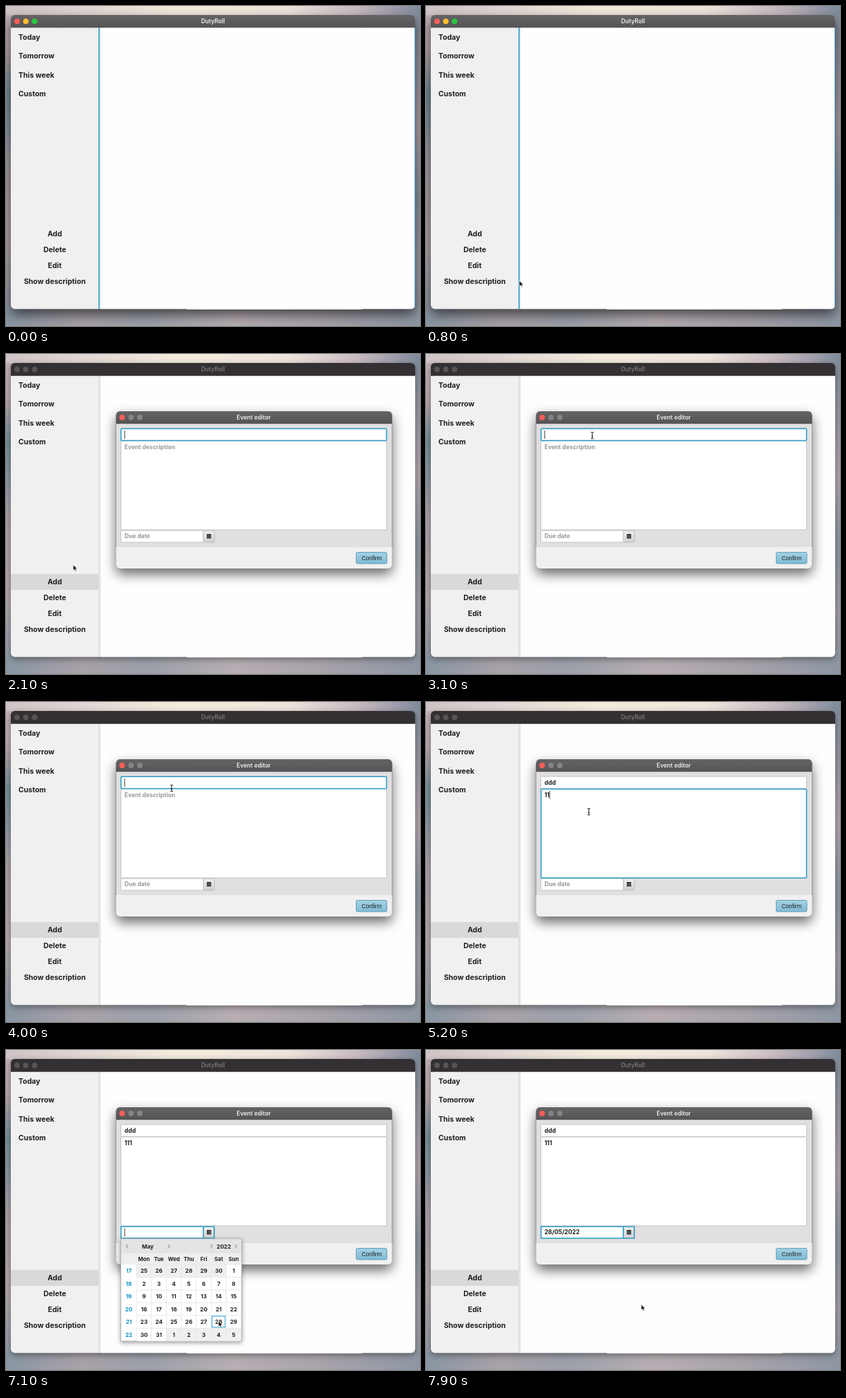
Recreate the animation shown at these times as an HTML page. Size 600 by 464 pixels, loop 8000 ms.

```html
<!DOCTYPE html>
<html lang="en">
<head>
<meta charset="utf-8">
<title>Event editor</title>
<style>
html, body { margin: 0; width: 100%; height: 100%; overflow: hidden; }
svg {
  display: block; width: 600px; height: 464px;
  background:
    linear-gradient(90deg, #cfc4c5, #e2d8d4 20%, #f3ecdd 42%, #eee4dc 68%, #cabdc2 84%, #a9a3b0 92%, #7d8b9b) 0 0 / 600px 13px no-repeat,
    linear-gradient(90deg, #8896a2, #a9a1a9 18%, #9ba0a9 34%, #b7adb3 55%, #aaa3ab 75%, #8d97a3) 0 439px / 600px 25px no-repeat,
    linear-gradient(#c3b4b9, #b9a6ab 14%, #748d97 27%, #7f929c 34%, #a99fa8 50%, #b3a8ae 75%, #8896a2) 0 0 / 300px 464px no-repeat,
    linear-gradient(#7d8b9b, #9a97a2 20%, #b0a4ac 38%, #8a95a1 60%, #a39da6 80%, #8d97a3) 300px 0 / 300px 464px no-repeat;
}
text { font: 700 8.6px Inter, sans-serif; fill: #1f1f1f; white-space: pre; }
.side text { font-size: 10.5px; }
.mid { text-anchor: middle; }
.bar { font-weight: 600; font-size: 8.5px; fill: #eee; text-anchor: middle; }
.prompt { fill: #9a9a9a; }
.field { fill: #fff; stroke: #c4c3c5; }
.ring { fill: none; stroke: #2e9fc6; stroke-width: 1.6; }
.caret { stroke: #222; stroke-width: .9; }
.cal text { font-size: 8.1px; text-anchor: middle; }
.cal .week { fill: #0b93c4; }
.chev { fill: none; stroke: #666; stroke-width: .9; }

.front { filter: drop-shadow(0 8px 9px rgba(0,0,0,.6)); }
.back { filter: drop-shadow(0 3px 5px rgba(0,0,0,.4)); }
.pop { filter: drop-shadow(0 2px 3px rgba(0,0,0,.4)); }

/* One loop is 8 s, so 1.25% is 100 ms. */
.k { animation: 8s step-end infinite; }
.active { animation-name: active; }
.inactive, .dialog { animation-name: dialog; }
.listFocus { animation-name: listFocus; }
.picked { animation-name: picked; }
.onTitle { animation-name: onTitle; }
.onText { animation-name: onText; }
.onDate { animation-name: onDate; }
.textPrompt { animation-name: textPrompt; }
.datePrompt { animation-name: datePrompt; }
.cal { animation-name: cal; }
.dateValue { animation-name: dateValue; }
.d1 { animation-name: d1; } .d2 { animation-name: d2; } .d3 { animation-name: d3; }
.n1 { animation-name: n1; } .n2 { animation-name: n2; } .n3 { animation-name: n3; }
.titleCaret { animation-name: titleCaret; }
.textCaret { animation-name: textCaret; }
.arrow { animation-name: arrow; }
.beam { animation-name: beam; }
.blink { animation: blink 1s -.2s step-end infinite; }
.blink.date { animation-delay: 0s; }
.pointer { animation: path 8s ease-in-out infinite; }

@keyframes active { 0% { opacity: 1 } 22.5%, to { opacity: 0 } }
@keyframes dialog { 0% { opacity: 0 } 22.5%, to { opacity: 1 } }
@keyframes listFocus { 0% { opacity: 1 } 16.25%, to { opacity: 0 } }
@keyframes picked { 0% { opacity: 0 } 13.75%, to { opacity: 1 } }
@keyframes onTitle { 0% { opacity: 1 } 58.75%, to { opacity: 0 } }
@keyframes onText { 0% { opacity: 0 } 58.75% { opacity: 1 } 75%, to { opacity: 0 } }
@keyframes onDate { 0% { opacity: 0 } 75%, to { opacity: 1 } }
@keyframes textPrompt { 0% { opacity: 1 } 58.75%, to { opacity: 0 } }
@keyframes datePrompt { 0% { opacity: 1 } 75%, to { opacity: 0 } }
@keyframes cal { 0% { opacity: 0 } 76.25% { opacity: 1 } 90%, to { opacity: 0 } }
@keyframes dateValue { 0% { opacity: 0 } 90%, to { opacity: 1 } }
@keyframes d1 { 0% { opacity: 0 } 52.5%, to { opacity: 1 } }
@keyframes d2 { 0% { opacity: 0 } 53.75%, to { opacity: 1 } }
@keyframes d3 { 0% { opacity: 0 } 56.25%, to { opacity: 1 } }
@keyframes n1 { 0% { opacity: 0 } 61.25%, to { opacity: 1 } }
@keyframes n2 { 0% { opacity: 0 } 63.75%, to { opacity: 1 } }
@keyframes n3 { 0% { opacity: 0 } 66.25%, to { opacity: 1 } }
@keyframes titleCaret {
  0% { transform: none } 52.5% { transform: translateX(5.5px) }
  53.75% { transform: translateX(11px) } 56.25%, to { transform: translateX(16.5px) }
}
@keyframes textCaret {
  0% { transform: none } 61.25% { transform: translateX(3.6px) }
  63.75% { transform: translateX(7.2px) } 66.25%, to { transform: translateX(10.8px) }
}
@keyframes blink { 0% { opacity: 1 } 50%, to { opacity: 0 } }
@keyframes arrow { 0% { opacity: 1 } 32.5% { opacity: 0 } 72.5%, to { opacity: 1 } }
@keyframes beam { 0% { opacity: 0 } 32.5% { opacity: 1 } 72.5%, to { opacity: 0 } }
@keyframes path {
  0%, 5% { transform: translate(190px, 470px) }
  15%, 23.75% { transform: translate(81px, 327px) }
  35%, 38.75% { transform: translate(241px, 118px) }
  50% { transform: translate(240px, 125px) }
  58.75%, 67.5% { transform: translate(236px, 159px) }
  73.75%, 76.25% { transform: translate(293px, 264px) }
  78.75% { transform: translate(288px, 289px) }
  87.5%, 90% { transform: translate(308px, 393px) }
  98.75%, to { transform: translate(312px, 369px) }
}
</style>
</head>
<body>
<svg viewBox="0 0 600 464">
  <defs>
    <linearGradient id="bar" x2="0" y2="1"><stop stop-color="#656365"/><stop offset="1" stop-color="#555355"/></linearGradient>
    <linearGradient id="edge"><stop stop-color="#000" stop-opacity=".16"/><stop offset="1" stop-color="#000" stop-opacity="0"/></linearGradient>
    <linearGradient id="blue" x2="0" y2="1"><stop stop-color="#a5d2e4"/><stop offset="1" stop-color="#7fbad3"/></linearGradient>
    <linearGradient id="grey" x2="0" y2="1"><stop stop-color="#eee"/><stop offset="1" stop-color="#d2d1d3"/></linearGradient>
    <clipPath id="main"><rect x="7" y="13" width="586" height="426.5" rx="6"/></clipPath>
    <clipPath id="box"><rect x="159.500" y="83" width="400" height="228" rx="6"/></clipPath>
  </defs>

  <rect class="k active front" x="7" y="13" width="586" height="426.500" rx="6"/>
  <rect class="k inactive back" x="7" y="13" width="586" height="426.500" rx="6"/>
  <g clip-path="url(#main)">
    <path fill="#fefefe" d="M7 13h586v427H7z"/>
    <path fill="#f1f0f1" d="M7 31h127.500v409H7z"/>
    <path fill="url(#edge)" d="M134.500 31h4v409h-4z"/>
    <path class="k picked" fill="#dad9da" d="M7 319h127v23H7z"/>
    <path class="k listFocus ring" d="M134.800 31v409M593 31v409"/>
    <path fill="url(#bar)" d="M7 13h586v18.500H7z"/>
    <path class="k inactive" fill="#332f32" d="M7 13h586v18.500H7z"/>
  </g>
  <g class="k active">
    <circle cx="16" cy="22.300" r="4" fill="#fe5f57"/>
    <circle cx="28.700" cy="22.300" r="4" fill="#febc2e"/>
    <circle cx="41.400" cy="22.300" r="4" fill="#28c840"/>
    <text class="bar" x="300" y="25.300">DutyRoll</text>
  </g>
  <g class="k inactive" fill="#575457">
    <circle cx="16" cy="22.300" r="4"/><circle cx="28.700" cy="22.300" r="4"/><circle cx="41.400" cy="22.300" r="4"/>
    <text class="bar" x="300" y="25.300" style="fill:#797679">DutyRoll</text>
  </g>
  <g class="side">
    <text x="18" y="48.700">Today</text>
    <text x="18" y="76.200">Tomorrow</text>
    <text x="18" y="103.700">This week</text>
    <text x="18" y="131.200">Custom</text>
    <g class="mid">
      <text x="70.700" y="333.500">Add</text>
      <text x="70.700" y="356.500">Delete</text>
      <text x="70.700" y="379.700">Edit</text>
      <text x="70.700" y="402.500">Show description</text>
    </g>
  </g>

  <g class="k dialog">
    <rect class="front" x="159.500" y="83" width="400" height="228" rx="6"/>
    <g clip-path="url(#box)">
      <path fill="#e1dfe1" d="M159 83h401v229H159z"/>
      <path fill="#f1f0f1" d="M159 280h401v32H159z"/>
      <path fill="url(#bar)" d="M159 83h401v18.300H159z"/>
    </g>
    <circle cx="168.300" cy="92" r="4" fill="#fe5f57"/>
    <circle cx="181.200" cy="92" r="4" fill="#858385"/>
    <circle cx="194" cy="92" r="4" fill="#858385"/>
    <text class="bar" x="359" y="95">Event editor</text>

    <rect class="field" x="166.500" y="108" width="385" height="17.500" rx="1"/>
    <rect class="field" x="166.500" y="126" width="385" height="129" rx="1"/>
    <rect class="field" x="166.500" y="256" width="120" height="17" rx="1"/>
    <rect x="286" y="256" width="16" height="17" rx="1" fill="url(#grey)" stroke="#b9b8ba"/>
    <path fill="#333" d="M291 261h6.300v6.500H291z"/>
    <path stroke="#aaa" stroke-width=".5" d="M291.500 263.300h5.300M291.500 265.300h5.300"/>
    <rect x="507.500" y="287.500" width="44.500" height="16.500" rx="2" fill="url(#blue)" stroke="#5f9fb9"/>
    <text class="mid" x="530" y="298.800" style="font:8.300px 'Liberation Sans',sans-serif">Confirm</text>

    <text x="171.700" y="120"><tspan></tspan></text>
    <g>
      <text class="k d1" x="171.700" y="120">d</text>
      <text class="k d2" x="177.200" y="120">d</text>
      <text class="k d3" x="182.700" y="120">d</text>
      <text class="k n1" x="171.700" y="137.600">1</text>
      <text class="k n2" x="175.300" y="137.600">1</text>
      <text class="k n3" x="178.900" y="137.600">1</text>
    </g>
    <text class="k textPrompt prompt" x="171.700" y="137.600">Event description</text>
    <text class="k datePrompt prompt" x="171.700" y="267.400">Due date</text>
    <text class="k dateValue" x="171.700" y="267.400">28/05/2022</text>

    <g class="k onTitle">
      <rect class="ring" x="166.700" y="108.300" width="384.800" height="17.200" rx="1"/>
      <g class="k titleCaret"><path class="caret blink" d="M172 111v12"/></g>
    </g>
    <g class="k onText">
      <rect class="ring" x="166.700" y="126.200" width="384.800" height="129" rx="1"/>
      <g class="k textCaret"><path class="caret blink" d="M172 129v11.500"/></g>
    </g>
    <g class="k onDate">
      <path class="ring" d="M166.700 256h135v17h-135zM286 256v17"/>
      <g class="k datePrompt"></g>
      <g class="k cal"><path class="caret blink date" d="M172 258.500v12"/></g>
    </g>
  </g>

  <g class="k cal">
    <rect class="pop" x="166.500" y="274" width="175" height="148" fill="#fff" stroke="#b8b7b9"/>
    <path fill="#e4e3e5" d="M167 274.500h174v20.500H167z"/>
    <path fill="#eeedef" d="M167 295h174v16H167z"/>
    <text x="205.500" y="288">May</text>
    <text x="315.700" y="288">2022</text>
    <path class="chev" d="M177 282l-2.700 2.800 2.700 2.800M234.500 282l2.700 2.800-2.700 2.800M299.500 282l-2.700 2.800 2.700 2.800M331.800 282l2.700 2.800-2.700 2.800"/>
    <g id="days"></g>
    <rect x="298.500" y="386" width="19" height="16" fill="none" stroke="#55b4d8" stroke-width="1.300"/>
  </g>

  <g class="pointer">
    <path class="k arrow" d="M0 0V8.300L1.900 6.600 3.200 9.400 4.500 8.800 3.200 6.100H5.800Z" fill="#000" stroke="#fff" stroke-width=".7"/>
    <path class="k beam" d="M-2-4.700Q0-4.700 0-3.500Q0-4.700 2-4.700M0-3.500V3.700M-2 4.900Q0 4.900 0 3.700Q0 4.900 2 4.900M-1 1.500H1" fill="none" stroke="#111" stroke-width="1"/>
  </g>
</svg>
<script>
const days = document.getElementById('days');
const cellW = 21.65, cellH = 18.5, left = 189.2, top0 = 311;

function add(tag, attrs, text = '') {
  const node = document.createElementNS('http://www.w3.org/2000/svg', tag);
  for (const key in attrs) node.setAttribute(key, attrs[key]);
  node.textContent = text;
  days.append(node);
}

'Mon Tue Wed Thu Fri Sat Sun'.split(' ').forEach((name, col) =>
  add('text', { x: left + (col + .5) * cellW, y: 306.3, style: 'font-size:7.8px' }, name));

for (let row = 0; row < 6; row++) {
  const y = top0 + row * cellH;
  add('text', { x: 178, y: y + 12.2, class: 'week' }, 17 + row);
  for (let col = 0; col < 7; col++) {
    const x = left + col * cellW;
    const date = new Date(2022, 3, 25 + row * 7 + col);
    const fill = date.getMonth() === 4 ? '#fff' : '#f0eff0';
    add('rect', { x, y, width: cellW, height: cellH, fill, stroke: '#e2e1e3', 'stroke-width': .6 });
    add('text', { x: x + cellW / 2, y: y + 12.2 }, date.getDate());
  }
}
</script>
</body>
</html>
```
